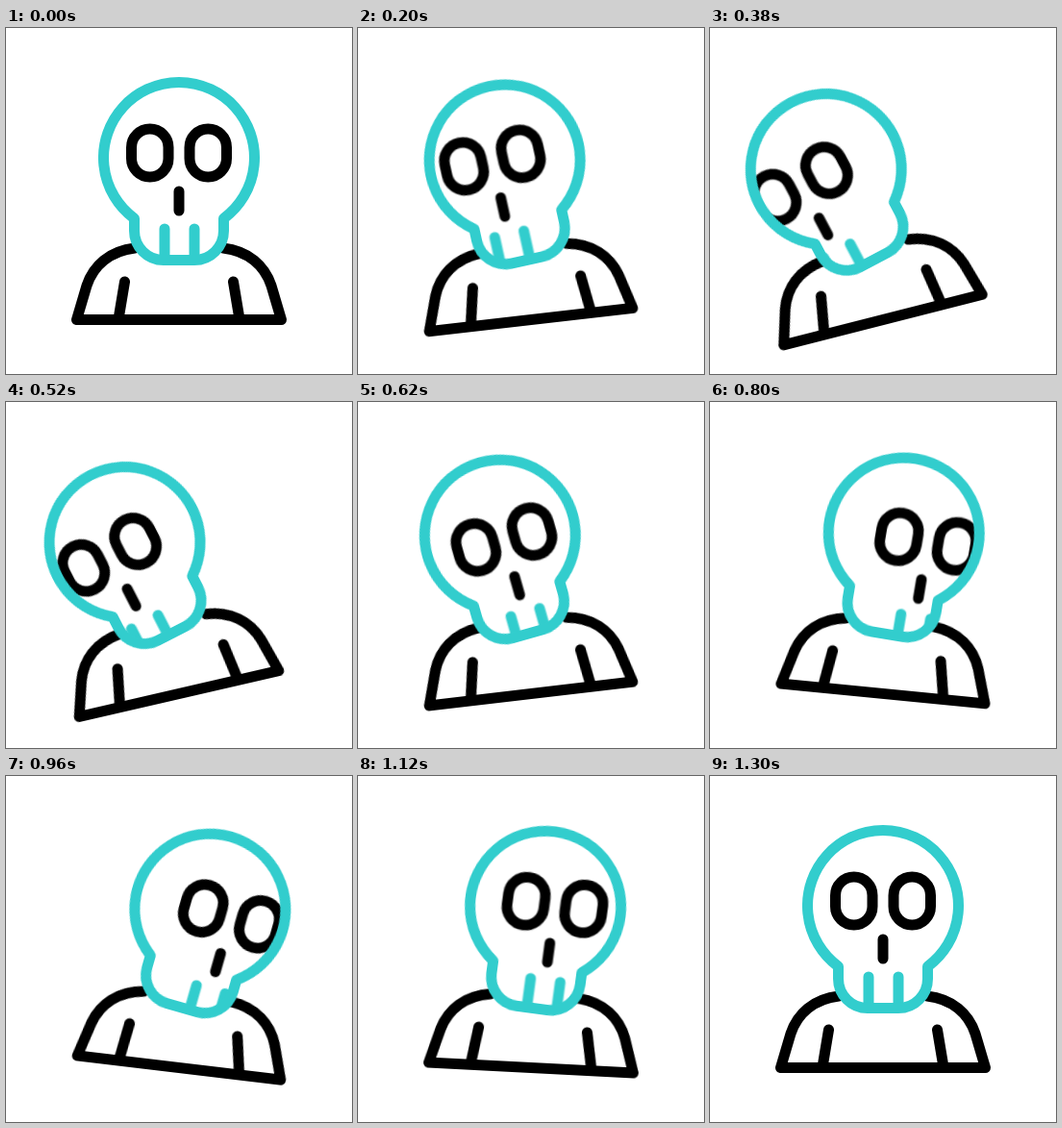
Animation, 360 px wide and 360 px high, one loop 2.4 s. Source, as an HTML page:

```html
<!DOCTYPE html>
<html lang="en">
<head>
<meta charset="utf-8">
<title>Swaying skeleton</title>
<style>
  html, body { margin: 0; width: 100%; height: 100%; overflow: hidden; background: #fff; }
  svg { display: block; width: 100%; height: 100%; }
  .line { fill: none; stroke: #000; stroke-width: 11; stroke-linecap: round; stroke-linejoin: round; }
  .teal { stroke: #32cdcd; }

  .body, .head, .slide, .drop {
    animation: 2.4s infinite cubic-bezier(.3333, 0, .6667, 1);
  }
  .body { transform-origin: 180px 303.5px; animation-name: sway; }
  .head { transform-origin: 180px 215px; animation-name: tilt; }
  .slide { animation-name: slide; }
  .drop { animation-name: drop; }

  @keyframes sway {
    0%, 54.1667%, 100% { transform: rotate(0deg); }
    18.3333% { transform: rotate(-15deg); }
    36.6667% { transform: rotate(7.5deg); }
  }
  /* the head trails the shoulders a little */
  @keyframes tilt {
    0%, 54.1667%, 100% { transform: rotate(0deg); }
    19.5% { transform: rotate(-15deg); }
    39.4% { transform: rotate(9.2deg); }
  }
  /* the face turns from side to side and dips */
  @keyframes slide {
    0% { transform: translateX(0); animation-timing-function: cubic-bezier(.45, 0, .65, 1); }
    17.5% { transform: translateX(-31px); animation-timing-function: cubic-bezier(.3, 0, .47, 1); }
    35.6% { transform: translateX(27px); }
    54.1667%, 100% { transform: translateX(0); }
  }
  @keyframes drop {
    0%, 54.1667%, 100% { transform: translateY(0); }
    28.3333% { transform: translateY(10.6px); }
  }
</style>
</head>
<body>
<svg viewBox="0 0 360 360">
  <defs>
    <path id="skull" d="M133.5 198.2A78.5 78.5 0 1 1 226.5 198.2V211A30.5 30.5 0 0 1 196 241.5H164A30.5 30.5 0 0 1 133.5 211Z"/>
    <clipPath id="inside"><use href="#skull"/></clipPath>
  </defs>
  <g class="body">
    <path class="line" d="M134 229C108 232 91 247 84 268L73.5 303.5H286.5L276 268C269 247 252 232 226 229M123.5 264L117 303M236.5 264L243 303"/>
    <g class="head">
      <use href="#skull" fill="#fff"/>
      <g clip-path="url(#inside)">
        <g class="slide">
          <g class="drop">
            <rect class="line" x="130.5" y="105" width="38.5" height="50" rx="19.2"/>
            <rect class="line" x="191" y="105" width="38.5" height="50" rx="19.2"/>
            <path class="line" d="M180 170V190"/>
            <path class="line teal" d="M165 209V241M196 209V241"/>
          </g>
        </g>
      </g>
      <use href="#skull" class="line teal"/>
    </g>
  </g>
</svg>
</body>
</html>
```
